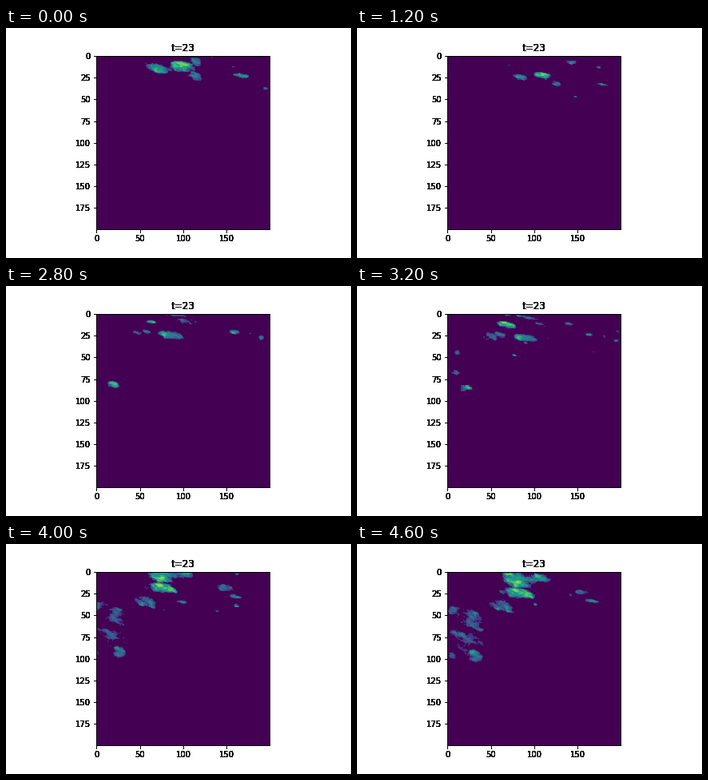
Animation of 432x288 px, one loop 4.8 s. Source, as a matplotlib script:

```python
import numpy as np
import matplotlib.pyplot as plt
from matplotlib.animation import FuncAnimation

N, FRAMES, STEP = 200, 24, 200
DRIFT = np.array([2.0, 1.7])  # wind, in grid cells per step

plt.rcParams.update({"font.family": "DejaVu Sans", "font.size": 10,
                     "axes.titlesize": 12})
rng = np.random.default_rng(23)
Y, X = np.mgrid[0:N, 0:N]
cells = []


def cloud_noise(power=1.7, coarsest=8):
    """Tileable fractal noise, streaked along a gentle downward slope."""
    ky = np.fft.fftfreq(N)[:, None] * N
    kx = np.fft.fftfreq(N)[None, :] * N
    k = np.hypot(1.7 * kx + 0.5 * ky, ky)
    amp = np.maximum(k, coarsest) ** -power
    z = np.fft.ifft2(np.fft.fft2(rng.normal(size=(N, N))) * amp).real
    return (z - z.mean()) / z.std()


def storm(strength, life, *peaks):
    """Add cells, each given by its peak: (time, x, y, half width, half height)."""
    for time, x, y, rx, ry in peaks:
        offset = rng.integers(0, N, 2)
        cells.append((strength, life, time, np.array([x, y]), rx, ry, offset))


# the first band dissolves while a second one enters from the top
storm(.42, 10, (0, 73, 14, 14, 4.5), (0, 97, 13, 13, 5), (0, 113, 22, 9, 5),
      (0, 165, 23, 8, 2))
storm(.38, 8.5, (10, 95, 2, 13, 5), (10, 151, 14, 8, 3), (11, 184, 22, 4, 3),
      (14, 87, 25, 11, 4))
# short showers
storm(.36, 4, (0, 114, 6, 5, 5), (10, 139, 37, 7, 5), (14, 88, 1, 18, 2),
      (14, 19, 82, 5, 3), (16, 62, 24, 6, 4))
# growing north and west clusters, with faint streaks in the east
storm(.45, 11, (22, 62, 35, 16, 7), (23, 81, 25, 15, 5.5), (23, 107, 8, 11, 4),
      (24, 85, 11, 16, 9))
storm(.33, 10, (21, 5, 41, 7, 5), (24, 27, 58, 13, 11), (24, 25, 82, 16, 11),
      (23, 32, 98, 7, 6), (23, 5, 99, 5, 4))
storm(.24, 6, (20, 148, 19, 8, 3), (22, 163, 32, 7, 1.5))
# stray drizzle
for _ in range(36):
    storm(.28, 2, (rng.uniform(0, FRAMES), rng.uniform(60, 198),
                   rng.uniform(0, 50), 2, 1))

NOISE = cloud_noise(), cloud_noise()


def rain(t):
    """Rainfall field at step t, each cell carrying its own texture along."""
    field = np.zeros((N, N))
    mix = 0.8 * t / FRAMES
    texture = np.cos(mix) * NOISE[0] + np.sin(mix) * NOISE[1]
    for strength, life, time, peak, rx, ry, offset in cells:
        age = t - time
        if abs(age) >= life:
            continue
        size = np.cos(np.pi / 2 * age / life)
        x, y = peak + DRIFT * age
        n = np.roll(texture, (int(y) + offset[1], int(x) + offset[0]), (0, 1))
        d2 = ((X - x) / rx) ** 2 + ((Y - y - 0.15 * (X - x)) / ry) ** 2
        m = 1 - d2 / size ** 2 + 0.65 * np.clip(n, -2, 1.8)
        value = strength * (0.3 + 0.7 * np.clip(m, 0, 1.2))
        value *= 1 + 0.45 * np.clip(n - 1, 0, 1.5)  # bright cores
        field = np.maximum(field, np.where(m > 0, value, 0))
    return field


def add_axes():
    ax = fig.add_subplot(label=str(len(fig.axes)))
    ax.patch.set_visible(False)
    ax.set_aspect("equal")
    ax.set(xlim=(-.5, N - .5), ylim=(N - .5, -.5), title="t=23",
           xticks=range(0, N, 50), yticks=range(0, N, 25))
    return ax


fig = plt.figure(figsize=(6, 4), dpi=72, facecolor="white")
fig.subplots_adjust(left=.125, right=.9, bottom=.125, top=.88)

# stacked axes give the heavy, hard-edged lettering
axes = [add_axes() for _ in range(9)]
image = axes[0].imshow(rain(0), cmap="viridis", vmin=0, vmax=1,
                       interpolation="nearest")


def update(t):
    image.set_data(rain(t))
    return [image]


anim = FuncAnimation(fig, update, frames=FRAMES, interval=STEP,
                     repeat=True, repeat_delay=0, blit=False)
plt.show()
```
